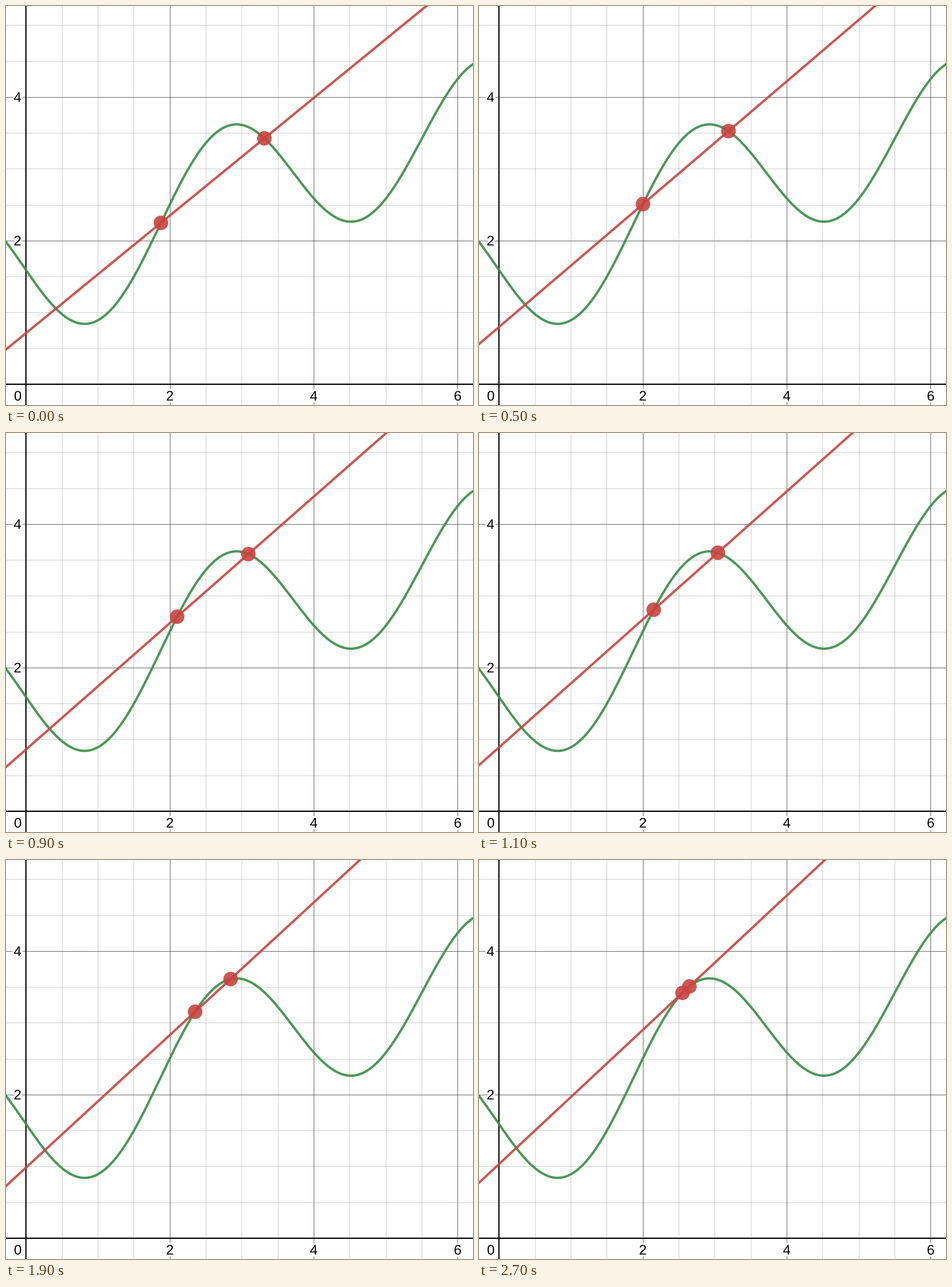
Write a matplotlib script that moves like this. It is 809 px wide and 692 px high and loops after 2800 ms.

```python
import numpy as np
import matplotlib.pyplot as plt
from matplotlib import patheffects
from matplotlib.animation import FuncAnimation
from matplotlib.patches import Circle

W, H, DPI = 809, 692, 64
PX = 72 / DPI  # points per pixel
FRAMES, INTERVAL = 28, 100

GREEN, RED = "#388c46", "#c74440"
X0, Y0 = 34.5, 656         # origin of the plot on the stage
UNIT_X, UNIT_Y = 124.67, 124.5


def to_px(x, y):
    return X0 + UNIT_X * x, Y0 - UNIT_Y * y


def wave(x):
    """Sine on a slope, bent gently at both ends."""
    return (1.494 + 0.392 * x + 1.006 * np.sin(1.699 * (x - 1.865))
            - 0.0006 * (x - 2.6) ** 5)


fig = plt.figure(figsize=(W / DPI, H / DPI), dpi=DPI, facecolor="white")
ax = fig.add_axes([0, 0, 1, 1])
ax.set_xlim(0, W)
ax.set_ylim(H, 0)
ax.axis("off")


def rule(draw, pos, major):
    draw(int(pos) + 0.5, color="black", alpha=0.56 if major else 0.18,
         lw=1.1 * PX, zorder=1, snap=False)


def label(value, x, y):
    halo = patheffects.withStroke(linewidth=7 * PX, foreground="white")
    ax.text(x, y + 8.3, str(value), family="Liberation Sans",
            fontsize=24 * PX, ha="center", va="baseline", color="black",
            zorder=3, path_effects=[halo])


for k in range(1, 13):
    rule(ax.axvline, X0 + 0.4 + UNIT_X / 2 * k, k % 4 == 0)
for k in range(1, 11):
    rule(ax.axhline, Y0 + 0.3 - UNIT_Y / 2 * k, k % 4 == 0)
for draw, pos in ((ax.axvline, X0), (ax.axhline, Y0)):
    draw(pos, color="black", lw=2.2 * PX, zorder=2, snap=False)

label(0, 20.5, 676)
for n in (2, 4, 6):
    label(n, X0 + UNIT_X * n, 676)
for n in (2, 4):
    label(n, 20, Y0 - UNIT_Y * n)

xs = np.linspace(-0.3, 6.25, 600)
ax.plot(*to_px(xs, wave(xs)), color=GREEN, alpha=0.9, lw=4.1 * PX, zorder=4)
secant, = ax.plot([], [], color=RED, alpha=0.9, lw=4.1 * PX, zorder=5,
                  snap=False)
dots = [ax.add_patch(Circle((0, 0), 12.6, fc=RED, ec="none", alpha=0.9,
                            zorder=6)) for _ in range(2)]


def update(i):
    x = np.array([1.876 + 0.025 * i, 3.3135 - 0.0247 * i])
    y = wave(x)
    slope = (y[1] - y[0]) / (x[1] - x[0])
    ends = np.array([-0.5, 6.5])
    secant.set_data(*to_px(ends, y[0] + slope * (ends - x[0])))
    for dot, px, py in zip(dots, *to_px(x, y)):
        dot.center = px, py
    return [secant, *dots]


anim = FuncAnimation(fig, update, frames=FRAMES, interval=INTERVAL,
                     repeat=True, repeat_delay=0, blit=False)
plt.show()
```
